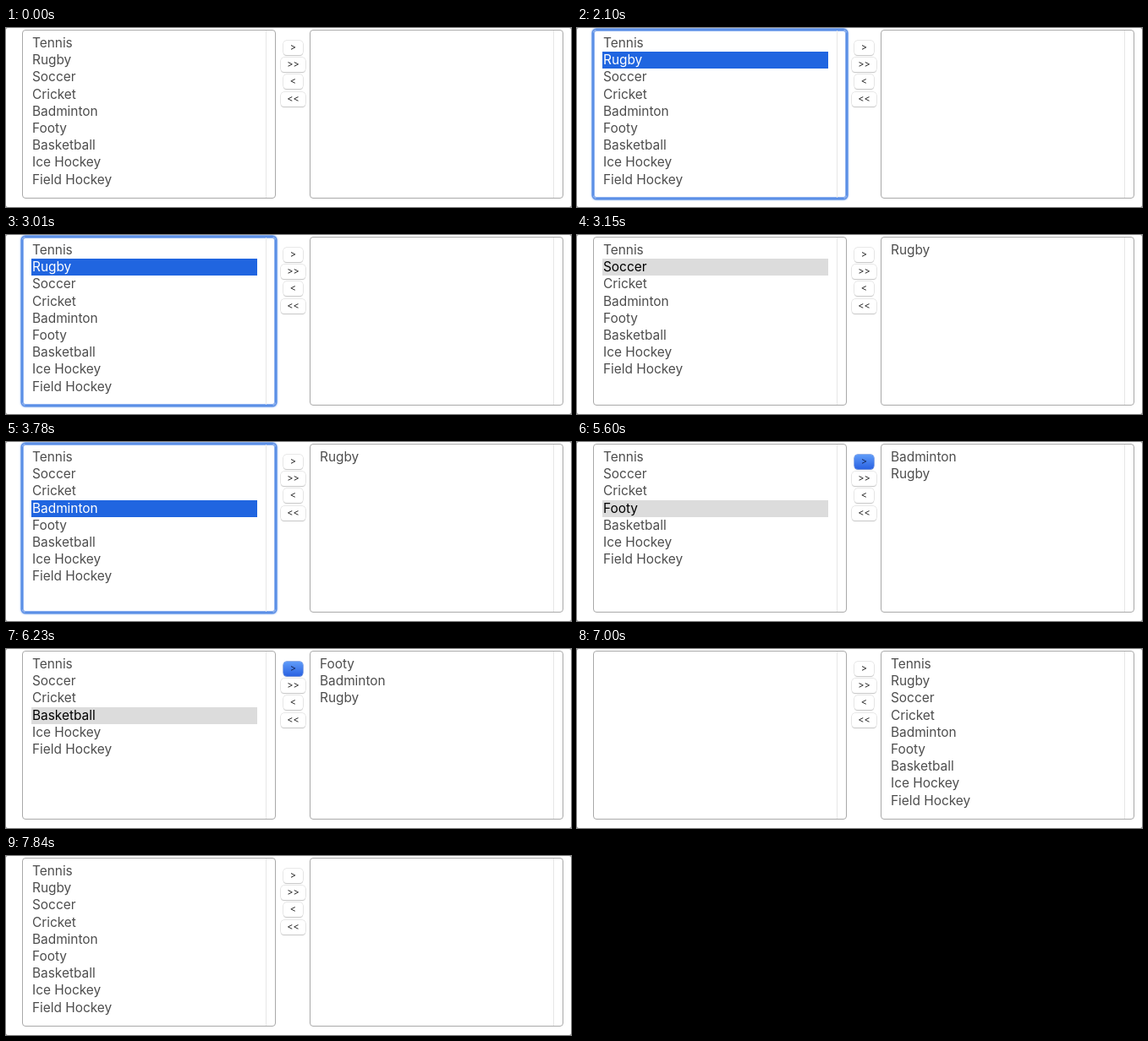
Animation, 668 px wide and 212 px high, one loop 8 s. Source, as an HTML page:

```html
<!DOCTYPE html>
<html lang="en">
<head>
<meta charset="utf-8">
<title>Dual list box</title>
<style>
  html, body { margin: 0; width: 100%; height: 100%; overflow: hidden; background: #8a8a8a; }
  #stage { position: relative; width: 668px; height: 212px; background: #fff; border-radius: 2px; font-family: Inter, sans-serif; }
  #stage div { position: absolute; box-sizing: border-box; }
  .list { top: 2px; width: 300px; height: 200px; border: 1px solid #a9a9a9; border-radius: 4px; }
  .list::after { content: ""; position: absolute; left: 287px; top: 0; bottom: 0; border-left: 1px solid #e6e6e6; }
  .list.focus { border-color: #5b8fe6; box-shadow: 0 0 0 1.5px #5b8fe6, 0 0 2px 2px #9dbdf2, inset 0 0 0 1px #8fb3f0; }
  .item { left: 10px; width: 267px; height: 20px; padding-left: 1px; font-size: 15.4px; line-height: 19px; color: #4d4d4d; white-space: pre; }
  .item.selected { background: #dcdcdc; color: #000; }
  .focus .item.selected { background: #2065e0; color: #fff; }
  .button { height: 17px; border-radius: 4px; background: #fff; box-shadow: 0 0 0 .5px #d2d2d2, 0 1px 1px #bdbdbd;
    font-size: 11px; line-height: 17px; text-align: center; color: #2a2a2a; }
  .button.pressed { background: linear-gradient(#5f9bf8, #2a62e2); box-shadow: 0 0 0 .5px #2f62cf, 0 1px 1px #a9b9dc; color: #14275a; }
</style>
</head>
<body>
<div id="stage"></div>
<script>
const LOOP = 8000;
const SPORTS = ["Tennis", "Rugby", "Soccer", "Cricket", "Badminton", "Footy", "Basketball", "Ice Hockey", "Field Hockey"];
const BUTTONS = [[">", 328, 23], [">>", 325, 29], ["<", 328, 23], ["<<", 325, 29]];

const select = row => s => { s.selected = row; s.focus = true; };
const press = button => s => { s.pressed = button; s.focus = false; };
const moveOne = s => { s.right.unshift(...s.left.splice(s.selected, 1)); s.pressed = -1; };
const moveAll = (left, right) => s => Object.assign(s, { left, right, selected: -1, pressed: -1 });

const EVENTS = [
  [2100, select(1)], [3080, press(0)], [3150, moveOne],
  [3780, select(3)], [4690, press(0)], [4830, moveOne],
  [5600, press(0)], [5740, moveOne],
  [6230, press(0)], [6370, moveOne],
  [6930, press(1)], [7000, moveAll([], SPORTS)],
  [7630, press(3)], [7770, moveAll(SPORTS, [])],
];

const stage = document.getElementById("stage");

function add(parent, className, style, text = "") {
  const node = document.createElement("div");
  node.className = className;
  node.textContent = text;
  for (const key in style) node.style[key] = style[key] + "px";
  return parent.appendChild(node);
}

function drawList(left, items, selected, focus) {
  const list = add(stage, focus ? "list focus" : "list", { left });
  items.forEach((text, row) =>
    add(list, row === selected ? "item selected" : "item", { top: Math.round(8 + 20.2 * row) - 3 }, text));
}

function draw(count) {
  const state = { left: [...SPORTS], right: [], selected: -1, focus: false, pressed: -1 };
  EVENTS.slice(0, count).forEach(([, apply]) => apply(state));
  stage.replaceChildren();
  drawList(19, state.left, state.selected, state.focus);
  drawList(359, state.right, -1, false);
  BUTTONS.forEach(([label, left, width], i) =>
    add(stage, i === state.pressed ? "button pressed" : "button", { left, width, top: Math.round(15 + 20.2 * i) }, label));
}

let shown = -1;
function tick() {
  const time = performance.now() % LOOP;
  const count = EVENTS.filter(([at]) => at <= time).length;
  if (count !== shown) draw(shown = count);
  requestAnimationFrame(tick);
}
tick();
</script>
</body>
</html>
```
